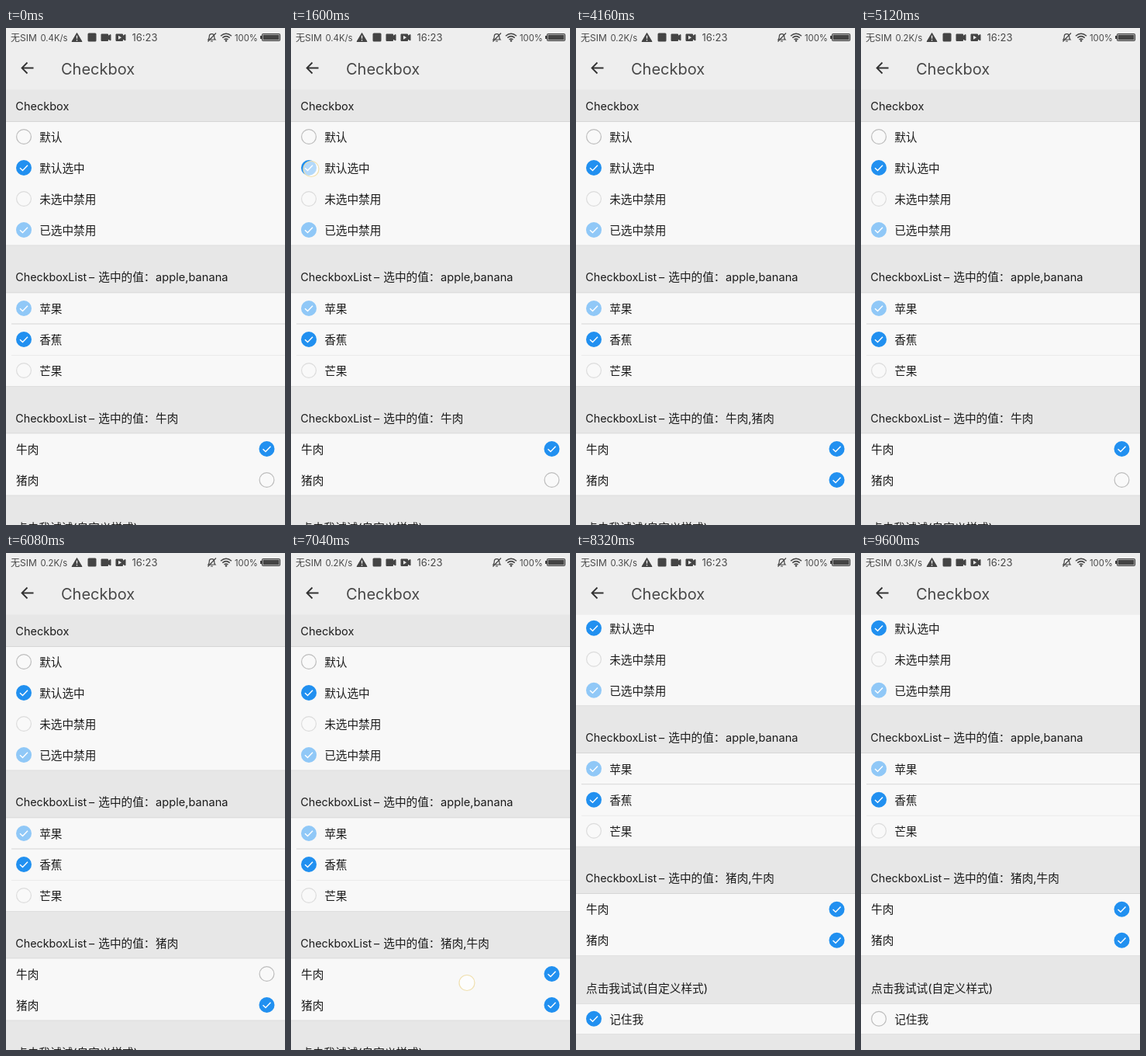
These frames come from a looping animation (360 px wide and 640 px high, 9.92 s). An HTML page:

```html
<!DOCTYPE html>
<html lang="zh-CN">
<head>
<meta charset="utf-8">
<title>Checkbox</title>
<style>
html, body { margin: 0; width: 100%; height: 100%; overflow: hidden; background: #e7e7e7; }
svg { display: block; width: 100%; height: 100%; }
text { font-family: Inter, "Noto Sans CJK SC", "Noto Sans CJK", sans-serif; fill: #1b1b1b; }
#header text { fill: #484848; }
</style>
</head>
<body>
<svg viewBox="0 0 360 640">
  <rect width="360" height="640" fill="#e7e7e7"/>
  <g id="content"></g>
  <g id="header">
    <rect width="360" height="79.5" fill="#eeeeee"/>
    <text x="6" y="16.5" font-size="12">无SIM</text>
    <text id="speed" x="44.5" y="16.5" font-size="11.3"></text>
    <path d="M91.5 6.5L98 17.5H85Z" fill="#444" stroke="#444" stroke-linejoin="round"/>
    <path d="M91.5 9.8v4M91.5 15v1.4" stroke="#eee" stroke-width="1.3"/>
    <rect x="105.500" y="6.5" width="11" height="11" rx="1.5" fill="#444"/>
    <path d="M123 8h8.5v2.5l3.5-2v7.5l-3.5-2v2.5H123Z" fill="#444" stroke="#444" stroke-linejoin="round"/>
    <path d="M142 8h8.5v2.5l3.5-2v7.5l-3.5-2v2.5H142Z" fill="#444" stroke="#444" stroke-linejoin="round"/>
    <path d="M145 9.7l4 2.5-4 2.5Z" fill="#eee"/>
    <text x="162.5" y="17" font-size="13">16:23</text>
    <g fill="none" stroke="#444" stroke-width="1.2">
      <path d="M261 15h9c-1.3-1.2-1.3-2.5-1.3-4.3c0-4.2-6.4-4.2-6.4 0c0 1.8 0 3.1-1.3 4.3ZM264 17h3M260.5 17.5L271 6.5"/>
      <path d="M277 10.2q7-6 14 0M279.3 12.6q4.7-4 9.4 0M281.5 14.9q2.5-2 5 0" stroke-width="1.5"/>
      <rect x="330.500" y="7.500" width="23" height="9" rx="1.500"/>
    </g>
    <circle cx="284" cy="16.5" r="1.3" fill="#444"/>
    <text x="295" y="16.5" font-size="11.3">100%</text>
    <rect x="331.600" y="8.600" width="20.800" height="6.800" fill="#444"/>
    <rect x="328" y="10" width="2.2" height="4" fill="#444"/>
    <path d="M35.5 51.5H20.5M27.5 44.5L20.5 51.5L27.5 58.5" fill="none" stroke="#333" stroke-width="1.8"/>
    <text x="71" y="60" font-size="20">Checkbox</text>
  </g>
  <circle id="touch" r="10" fill="#fff" fill-opacity=".66" stroke="#f0e0b0" stroke-width="1.2"/>
</svg>
<script>
const LOOP = 9920;
const SCROLL = 83.3;
const $ = id => document.getElementById(id);
const content = $('content');

function add(tag, attrs, parent = content, text = '') {
  const el = document.createElementNS('http://www.w3.org/2000/svg', tag);
  for (const k in attrs) el.setAttribute(k, attrs[k]);
  el.textContent = text;
  parent.append(el);
  return el;
}
const label = (x, y, s, size = 14.65) => add('text', { x, y, 'font-size': size }, content, s);
const line = (y, color = '#d6d6d6', x = 0) =>
  add('rect', { x, y, width: 360 - x, height: 1, fill: color });

function panel(y, h) {
  add('rect', { y, width: 360, height: h, fill: '#f8f8f8' });
  line(y);
  line(y + h - 0.5, '#dedede');
}

function box(x, y, checked, disabled) {
  const g = add('g', { transform: `translate(${x} ${y})` });
  const disc = add('circle', { 'stroke-width': 1.2 }, g);
  const tick = add('path', {
    d: 'M-5 .2L-1.5 3.6L5-3.2', fill: 'none', stroke: '#fff', 'stroke-width': 1.4
  }, g);
  const set = on => {
    disc.setAttribute('r', on ? 10 : 9.4);
    disc.setAttribute('fill', on ? (disabled ? '#90c8f7' : '#2190f0') : '#f9f9f9');
    disc.setAttribute('stroke', on ? 'none' : (disabled ? '#dcdcdc' : '#bdbdbd'));
    tick.style.display = on ? '' : 'none';
  };
  set(checked);
  return set;
}

function row(y, name, checked, disabled) {
  label(43.2, y + 5.9, name);
  return box(23, y, checked, disabled);
}

function listTitle(y) {
  label(12.3, y + 5, 'CheckboxList', 14.3);
  label(107, y + 5, '–', 14.3);
  label(119.3, y + 5, '选中的值：');
  return label(193, y + 5, '');
}

label(12.3, 106, 'Checkbox', 14.5);
panel(120, 160);
row(140, '默认', false);
const preset = row(180, '默认选中', true);
row(220, '未选中禁用', false, true);
row(260, '已选中禁用', true, true);

const fruits = listTitle(321);
panel(340.3, 121.2);
line(380.5, '#d8d8d8', 7);
line(421, '#ebebeb', 7);
row(361, '苹果', true, true);
const banana = row(401, '香蕉', true);
row(441, '芒果', false, true);

const meats = listTitle(502.7);
panel(521.3, 80.7);
label(13, 547.8, '牛肉');
label(13, 587.8, '猪肉');
const beef = box(336.5, 542, true);
const pork = box(336.5, 582, false);

label(13, 648.9, '点击我试试(自定义样式)');
panel(663, 40);
const remember = row(683, '记住我', false);

// Value of a stepped track: first value, then [time, value] changes.
function step(t, first, ...changes) {
  return changes.reduce((v, [at, next]) => (t >= at ? next : v), first);
}

function render(t) {
  const tap = step(t, null,
    [960, [24, 176]], [1280, null],
    [1600, [26, 181.5]], [1920, null],
    [5440, [338.5, 542.5]], [5760, null],
    [7040, [227, 553.5]], [7360, [265, 431]], [7680, null]);
  const hasBanana = step(t, true, [2560, false], [3200, true]);

  preset(step(t, true, [960, false], [1600, true]));
  banana(hasBanana);
  fruits.textContent = hasBanana ? 'apple,banana' : 'apple';
  beef(step(t, true, [5440, false], [6400, true]));
  pork(step(t, false, [4160, true], [5120, false], [6080, true]));
  meats.textContent = step(t, '牛肉', [4160, '牛肉,猪肉'], [5120, '牛肉'],
    [5440, ''], [6080, '猪肉'], [6400, '猪肉,牛肉']);
  remember(step(t, false, [8320, true], [8960, false]));

  content.setAttribute('transform', `translate(0 ${step(t, 0, [7360, -SCROLL])})`);
  $('speed').textContent = step(t, '0.4', [1920, '0.2'], [7680, '0.3']) + 'K/s';
  $('touch').style.display = tap ? '' : 'none';
  if (tap) $('touch').setAttribute('transform', `translate(${tap})`);
}

const start = performance.now();
function tick() {
  render((performance.now() - start) % LOOP);
  requestAnimationFrame(tick);
}
tick();
</script>
</body>
</html>
```
